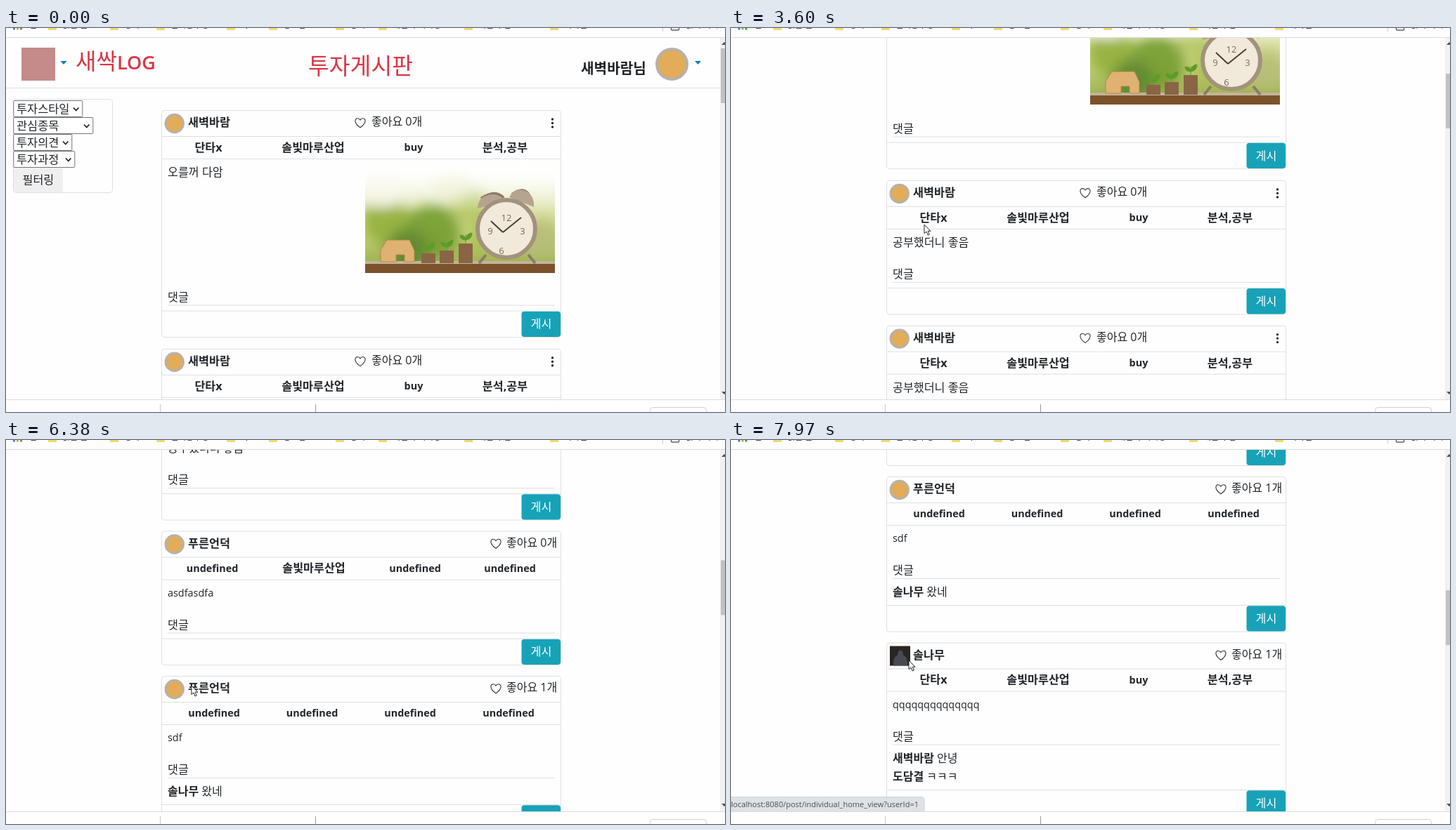
Animation, 1023 px wide and 547 px high, one loop 8 s. Source, as an HTML page:

```html
<!DOCTYPE html>
<html lang="ko">
<head>
<meta charset="utf-8">
<title>투자게시판</title>
<style>
  html, body { margin: 0; width: 100%; height: 100%; overflow: hidden; background: #fefefe; }
  svg { display: block; }
  text { font-family: "Open Sans", "Noto Sans CJK KR", "Noto Sans CJK", sans-serif; fill: #212529; white-space: pre; }
  .b { font-weight: 700; }
  .m { text-anchor: middle; }
  .line { stroke: #dfdfdf; fill: none; }
  .hover { text-decoration: underline; }
</style>
</head>
<body>
<svg id="stage" width="1023" height="547" viewBox="0 0 1023 547"></svg>
<script>
const LOOP = 8000;
const USER = '새벽바람', SECOND = '푸른언덕', THIRD = '솔나무', FOURTH = '도담결', STOCK = '솔빛마루산업';
const TAGS = ['단타x', STOCK, 'buy', '분석,공부'], TAG_X = [288, 437, 580, 710];
const U = 'undefined';

// ---- drawing helpers; text is placed by its vertical centre ----
const text = (x, y, s, cls = '', size = /^[a-z]+$/.test(s) ? 14.4 : 16.2, extra = '') =>
  `<text x="${x}" y="${y + size * .37}" class="${cls}" font-size="${size}" ${extra}>${s}</text>`;
const rect = (x, y, w, h, fill, extra = '') =>
  `<rect x="${x}" y="${y}" width="${w}" height="${h}" fill="${fill}" ${extra}/>`;
const circle = (x, y, r, fill, extra = '') => `<circle cx="${x}" cy="${y}" r="${r}" fill="${fill}" ${extra}/>`;
const path = (d, extra) => `<path d="${d}" ${extra}/>`;
const hline = (x1, x2, y) => path(`M${x1} ${y}H${x2}`, 'class="line"');
const caret = (x, y, id = '') => path(`M${x - 4.5} ${y - 2.5}h9l-4.5 5z`, `fill="#0b7bcb" ${id}`);
const avatar = (x, y, r, w) => circle(x, y, r, '#e2ac58', `stroke="#b5b1ac" stroke-width="${w}"`);
const heart = (x, y) => path(
  'M0 6.8C-9.5 .6-8-6.3-3.8-6.3-1.6-6.3-.5-5 0-4 .5-5 1.6-6.3 3.8-6.3 8-6.3 9.5 .6 0 6.8Z',
  `transform="translate(${x} ${y})" fill="none" stroke="#333" stroke-width="1.1"`);

function photo(x, y) {
  const blobs = [[30, 80, 34, '#8fae35'], [95, 95, 40, '#6f9a2c'], [150, 60, 28, '#b5c765'], [60, 120, 30, '#54812a'],
    [185, 100, 34, '#a9bd4c'], [125, 25, 26, '#e2e6b4'], [250, 105, 28, '#b6bd78'], [25, 30, 30, '#f3f2dc']]
    .map(([cx, cy, r, c]) => circle(cx, cy, r, c)).join('');
  const stacks = [[80, 126, 20], [106, 122, 20], [133, 112, 20]].map(([sx, sy, w]) =>
    rect(sx, sy, w, 140 - sy, '#8a6545') +
    path(`M${sx + 10} ${sy}v-13m0 8q-8 0-8-7q8 0 8 7q1-10 9-10q0 9-9 10`, 'fill="#5f9a2a" stroke="#5f9a2a"')).join('');
  const digits = [[201, 75, 12], [224, 94, 3], [194, 122, 6], [178, 94, 9]]
    .map(([dx, dy, n]) => text(dx, dy, n, 'm', 13, 'style="fill:#7b6a58"')).join('');
  return `<g transform="translate(${x} ${y})"><g clip-path="url(#frame)">
    ${rect(0, 0, 270, 154, 'url(#sky)')}<g filter="url(#soft)" opacity=".85">${blobs}</g>
    ${rect(0, 0, 270, 70, 'url(#fade)')}
    ${rect(0, 138, 270, 16, '#7b522b')}${rect(0, 137, 270, 4, '#c3b49a')}
    ${path('M22 138v-17l9-14h32l7 15v16h-14v-10h-12v10z', 'fill="#dfb272" stroke="#b98748"')}${stacks}
    ${path('M172 128l-10 12M232 128l10 12M165 48q20-14 32-1M209 42q22-16 28 12', 'stroke="#8d7b68" stroke-width="4" fill="none"')}
    ${path('M160 62q0-18 20-20q14 0 17 10zM205 46q6-13 20-10q16 5 15 24z', 'fill="#b5a48f"')}
    ${circle(201, 91, 41, '#f1eadb', 'stroke="#a3927c" stroke-width="6"')}${digits}
    ${path('M196 96l26-21M196 96l-17-16', 'stroke="#4a3f36" stroke-width="2"')}
  </g></g>`;
}

const nightPic = (x, y) => rect(x, y, 29, 28, '#2a2523') +
  path(`M${x + 5} ${y + 28}q-1-12 6-15q0-7 4-7t4 7q7 3 6 15z`, 'fill="#484a52"');

function card(p, i) {
  const { top: y, note, notes = [] } = p;
  const wide = p.own ? [504, 520] : [697, 712];
  const c = y + (p.photo ? 266 : 133.5);
  const foot = c + 20 + (notes.length ? 3.5 + 26.5 * notes.length : 0);
  return rect(221.5, y + .5, 568, foot + 37 - y, 'none', 'rx="4" class="line"') +
    (p.night ? nightPic(226, y + 5) : avatar(239.7, y + 19, 12.7, 3)) +
    text(259, y + 17, p.name, 'b', 16.3, `id="name${i}"`) +
    heart(wide[0], y + 18) + text(wide[1], y + 16.5, `좋아요 ${p.likes || 0}개`, '', 16) +
    (p.own ? [13, 18.5, 24].map(d => circle(777.5, y + d, 1.7, '#212529')).join('') : '') +
    hline(222, 789, y + 37.5) +
    p.tags.map((s, k) => text(p.cols[k], y + 53, s, 'b m')).join('') +
    hline(222, 789, y + 69.5) +
    text(230, y + 88, note) + (p.photo ? photo(511, y + 78) : '') +
    text(230, c, '댓글') + hline(230, 781, c + 12) +
    notes.map(([who, s], k) =>
      text(230, c + 31 + 26.5 * k, `<tspan class="b">${who}</tspan> ${s}`, '', 16)).join('') +
    hline(222, 789, foot) +
    rect(733.5, foot + .7, 55.5, 36.3, '#17a2b8', 'rx="4"') +
    text(761.5, foot + 18.5, '게시', 'm', 16.2, 'style="fill:#fff"');
}

const own = { name: USER, own: true, tags: TAGS, cols: TAG_X };
const study = { ...own, note: '공부했더니 좋음' };
const posts = [
  { ...own, top: 117, note: '오를꺼 다암', photo: true },
  { ...study, top: 456.8 }, { ...study, top: 663.5 }, { ...study, top: 870 },
  { top: 1076.5, name: SECOND, tags: [U, STOCK, U, U], cols: [293.5, 438, 582, 717], note: 'asdfasdfa' },
  { top: 1283, name: SECOND, likes: 1, tags: [U, U, U, U], cols: [296, 435.5, 575, 715], note: 'sdf', notes: [[THIRD, '왔네']] },
  { top: 1519.5, name: THIRD, night: true, likes: 1, tags: TAGS, cols: TAG_X, note: 'q'.repeat(14),
    notes: [[USER, '안녕'], [FOURTH, 'ㅋㅋㅋ']] },
];

const select = (y, w, s) => rect(10.8, y, w, 23, '#fff', 'rx="1" stroke="#767676"') + text(15, y + 11.5, s, '', 16.4) +
  path(`M${w - 2} ${y + 10}l3.7 4 3.7-4`, 'fill="none" stroke="#222" stroke-width="1.8"');

const header =
  rect(22, 28, 48, 47, '#c58a8a') + caret(82, 49.5) +
  text(99, 47, '새싹<tspan font-size="27" font-weight="600">LOG</tspan>', '', 32, 'style="fill:#dc3545"') +
  text(430, 54, '투자게시판', '', 32.4, 'style="fill:#dc3545"') +
  text(818, 58, USER + '님', 'b', 20.2) + avatar(947.5, 51.5, 21.5, 4) + caret(984.5, 49.5, 'id="menu"') +
  hline(0, 1016, 85.5) +
  rect(10.5, 101.5, 141, 133, 'none', 'rx="4" class="line"') +
  select(103.5, 98, '투자스타일') + select(127.5, 113, '관심종목') +
  select(151.5, 83, '투자의견') + select(175.5, 87, '투자과정') +
  rect(11, 199, 70, 35, '#efefef', 'rx="3"') + text(23.5, 216, '필터링');

const folders = [[60, '읽을 글'], [148, '경제'], [214, '언어공부장'], [314, '자료'], [374, '정보함'],
  [469, '정리'], [530, '개인적 기록장'], [652, '개발자 참고'], [774, '디자인']];
const chrome =
  rect(0, 0, 1023, 13, '#fefefe') + path('M0 13.5H1023M0 529.5H1023', 'stroke="#dcdcdc"') +
  ['#4285c4', '#d8a53a', '#4b9a6a'].map((c, i) => rect(10 + i * 5, 0, 3, 2.5, c)).join('') + text(33, -4, '앱', '', 12) +
  folders.map(([x, s]) => rect(x, -5, 12, 8, '#f5d76b', 'rx="1"') + text(x + 20, -4, s, '', 12)).join('') +
  path('M934.5 0V5', 'stroke="#ccc"') + rect(946.5, -8, 11, 11, 'none', 'rx="1" stroke="#5f6368" stroke-width="1.5"') +
  text(967, -4, '읽기 목록', '', 12) +
  rect(0, 530, 1023, 17, '#fefefe') +
  path('M219.5 536V547', 'stroke="#c8c8c8"') + path('M440.5 536V547', 'stroke="#999"') +
  rect(916.5, 540.5, 80, 30, '#fff', 'rx="4" stroke="#d0d0d0"');

const scrollbar = rect(1016, 14, 7, 515, '#f1f1f1') + rect(1017, 29, 6, 78, '#c1c1c1', 'id="thumb"') +
  path('M1018 24l4-4 4 4zM1018 518l4 4 4-4z', 'fill="#505050"');

const status = `<g id="status">${path('M-1 508.5H271q4 0 4 4V529.5H-1z', 'fill="#dee1e6" stroke="#cfd2d7"')}
  ${text(0, 519, 'localhost:8080/post/individual_home_view?userId=1', '', 11, 'style="fill:#4a4d52"')}</g>`;

const cursor = `<g id="cursor" fill="#fff" stroke="#222" stroke-linejoin="round">
  <path id="arrow" d="M0 0V12.6L3 10 5.2 15 7.3 14 5.2 9.2H9Z"/>
  <path id="hand" d="M-1.5 1Q0-1 1.5 1V6.5Q3-.2 3 6q2-1 2.5.8 2-.8 2.4 1.2Q9.5 8 9.5 10v3q0 2-1.8 4.5H.8Q-1-.0 -4.2 10.2Q-3.6 8.2-1.5 10Z"/></g>`;

document.getElementById('stage').innerHTML = `<defs>
  <clipPath id="view"><rect y="14" width="1016" height="515"/></clipPath>
  <clipPath id="frame"><rect width="270" height="154"/></clipPath>
  <filter id="soft"><feGaussianBlur stdDeviation="9"/></filter>
  <linearGradient id="sky" x2="0" y2="1"><stop stop-color="#fff"/><stop offset=".6" stop-color="#cdd585"/><stop offset="1" stop-color="#8fa845"/></linearGradient>
  <linearGradient id="fade" x2="0" y2="1"><stop stop-color="#fff"/><stop offset="1" stop-color="#fff" stop-opacity="0"/></linearGradient>
  </defs>
  <g clip-path="url(#view)"><g id="page">${header}${posts.map(card).join('')}</g></g>
  ${scrollbar}${status}${chrome}${cursor}`;

// ---- motion tables ----
// [first change, last change, steps]
const bursts = [[190, 930, 12], [1000, 1770, 12], [1840, 2620, 12], [2690, 3460, 12], [3530, 3820, 5],
  [4020, 4760, 12], [4830, 5590, 12], [5660, 6450, 11], [6520, 7270, 12], [7340, 7970, 10]];
// [time, scroll offset]
const wheel = [[0, 0], [2690, 0], [2960, 95], [3200, 95], [3400, 189], [3500, 189], [3696, 284], [4020, 284],
  [4497, 663], [4830, 663], [5080, 758], [5800, 758], [6010, 853], [6150, 853], [6360, 947], [6560, 947],
  [6743, 1042], [7090, 1231]];
// [time, x, y]
const mouse = [[190, 700, 532], [400, 790, 330], [600, 960, 90], [720, 988, 14], [930, 977, 39], [1300, 760, 120],
  [1770, 293, 256], [2050, 270, 186], [2200, 250, 126], [2340, 239, 158], [2620, 272, 252], [2900, 276, 272],
  [3600, 275, 280], [4430, 273, 306], [4900, 266, 330], [5380, 257, 336], [5660, 240, 338], [5900, 206, 345],
  [6200, 255, 352], [6450, 268, 349], [6660, 269, 348], [7000, 262, 318], [7270, 268, 306], [7450, 275, 294],
  [7620, 215, 322], [7740, 226, 334], [7860, 264, 308], [7970, 253, 314]];
// [from, to, post under the pointer]
const hovers = [[5100, 5600, 4], [6400, 6780, 5], [7110, 7520, 6], [7810, 7950, 6]];

const linear = u => u;
const smooth = u => (1 - Math.cos(Math.PI * u)) / 2;

function sample(keys, t, ease) {
  const i = keys.findIndex(k => k[0] > t);
  if (i < 0) return keys[keys.length - 1].slice(1);
  if (!i) return keys[0].slice(1);
  const a = keys[i - 1], b = keys[i], u = ease((t - a[0]) / (b[0] - a[0]));
  return a.slice(1).map((v, k) => v + (b[k + 1] - v) * u);
}

function hold(t) {
  const burst = bursts.filter(b => t >= b[0]).pop();
  if (!burst) return 0;
  const [from, to, n] = burst, step = (to - from) / (n - 1);
  return from + Math.min(n - 1, Math.floor((t - from) / step + .1)) * step;
}

const el = id => document.getElementById(id);
const [page, thumb, bar, pointer, arrow, hand, menu] =
  ['page', 'thumb', 'status', 'cursor', 'arrow', 'hand', 'menu'].map(el);
const names = posts.map((p, i) => el('name' + i));
const show = (node, on) => node.style.display = on ? '' : 'none';

function render(now) {
  const t = hold(now % LOOP);
  const [scroll] = sample(wheel, t, smooth), [x, y] = sample(mouse, t, linear);
  const hover = hovers.find(h => t >= h[0] && t < h[1]);
  page.setAttribute('transform', `translate(0 ${-scroll})`);
  thumb.setAttribute('y', 29 + scroll / 6.65);
  pointer.setAttribute('transform', `translate(${x} ${y})`);
  show(pointer, t >= 190);
  show(arrow, !hover);
  show(hand, hover);
  show(bar, t >= 7200);
  menu.setAttribute('fill', t < 930 ? '#0b7bcb' : '#5f86ad');
  names.forEach((n, i) => n.classList.toggle('hover', !!hover && hover[2] === i));
  requestAnimationFrame(() => render(performance.now() - start));
}
const start = performance.now();
render(0);
</script>
</body>
</html>
```
